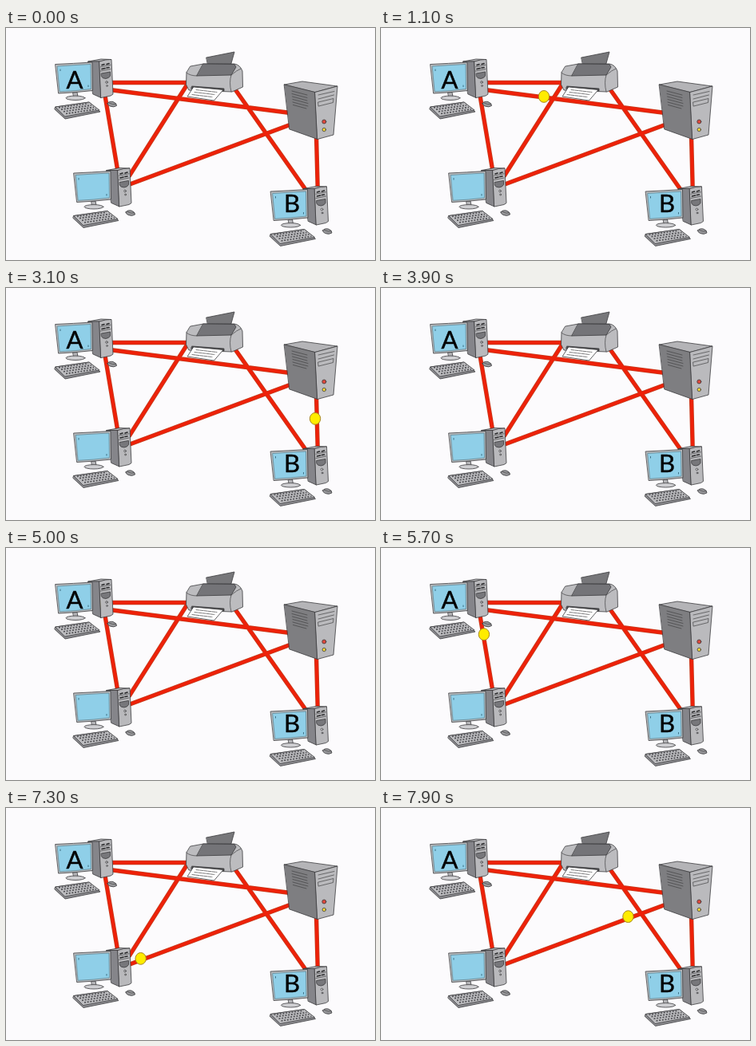
These frames come from a looping animation (462 px wide and 291 px high, 8000 ms). An HTML page:

```html
<!DOCTYPE html>
<html lang="en">
<head>
<meta charset="utf-8">
<title>Network routes</title>
<style>
  html, body { margin: 0; width: 100%; height: 100%; overflow: hidden; background: #fcfbfd; }
  svg { display: block; width: 462px; height: 291px; }
  .ink { stroke: #3c3c3e; stroke-width: .8; stroke-linejoin: round; stroke-linecap: round; }
  .thin { stroke: #424244; stroke-width: .7; fill: none; }
  .edge { stroke: #c43a1c; stroke-width: 5.4; fill: none; }
  .link { stroke: #ee2109; stroke-width: 3.8; fill: none; }
  text { font: 31px Lato, Carlito, sans-serif; text-anchor: middle; stroke: #000; stroke-width: .4; }
</style>
</head>
<body>
<svg viewBox="0 0 462 291">
  <defs>
    <path id="routes" d="M130 68.500H232M130 77.500L356 106.500M123.500 82L140 180M154 186L228 69M155 196L358 120.500M285.500 75L377.500 206M388.500 134L390.300 204"/>
    <g id="computer" class="ink">
      <!-- tower -->
      <path d="M103 42L119 39L132 39.500L117 42Z" fill="#b4b4b7"/>
      <path d="M103 42L117 42L119 87.500L109 83Z" fill="#85858a"/>
      <path d="M117 42Q125 39 132 39.500L134 83L131 85L119 87.500Z" fill="#b9b9bc"/>
      <path d="M120 46.500L123 45.500M126 45.500L129 44.500M120 51.500L124 50.500M126 50L129 49.500" stroke="#28282a" stroke-width="1.700"/>
      <path class="thin" d="M118.500 48.800L131 46.300M118.500 54L131 51.500"/>
      <path d="M119.500 57L130.500 55L130.500 60Q129 63 125 63.500Q121 63.500 119.500 61Z" fill="#77777b"/>
      <circle cx="126" cy="68" r="1.300" fill="#e6e6e8"/>
      <circle cx="126.500" cy="72.500" r=".9" fill="#e6e6e8"/>
      <!-- monitor -->
      <path d="M84 81L89 80.500L90 86L85 86.500Z" fill="#b5b5b8"/>
      <ellipse cx="87" cy="87.800" rx="12" ry="2.700" fill="#cfcfd2"/>
      <path d="M62 45.500Q84 44.500 108 43L108.500 78.500Q87 81 66 82Z" fill="#b9bcbf"/>
      <path d="M64.500 48Q85 46.500 106 45.500L106.500 76.500Q87 79 67.500 79.800Z" fill="#8fcfe8" stroke="#5f8796"/>
      <path d="M68 52v1.600M103 72v1.600" stroke="#28596b"/>
      <!-- keyboard -->
      <path d="M62 99L104 93L118 105L74 114L61 102Z" fill="#8d8d91"/>
      <path d="M62 99L104 93L117 103L74 111Z" fill="#bcbcbf"/>
      <path d="M66 99.800L103 94.700M69 102.200L107 97M72 104.800L110 99.400M75 107.500L113 101.800"
            fill="none" stroke="#4f4f53" stroke-width="1.700" stroke-dasharray="2 1.700" stroke-linecap="butt"/>
      <!-- mouse -->
      <path d="M127 94.500Q129 91.500 134 92.500Q139 94.500 138.500 97.500Q135 100 130 98Q127 96.500 127 94.500Z" fill="#99999c"/>
      <path class="thin" d="M129 94Q134 96.500 137.500 95.500"/>
    </g>
  </defs>

  <use href="#routes" class="edge"/>
  <use href="#routes" class="link"/>

  <ellipse id="packet" rx="6.700" ry="7.400" fill="#ffec00" stroke="#a8861c" stroke-width="1" visibility="hidden"/>

  <use href="#computer"/>
  <use href="#computer" x="23" y="136.500"/>
  <use href="#computer" x="269.500" y="159.500"/>
  <text x="86" y="75.500">A</text>
  <text x="358" y="230.500">B</text>

  <g class="ink">
    <!-- printer -->
    <path d="M251 37L286 30L281 48L253 47Z" fill="#77777a"/>
    <path d="M231 48L247 45L286 45Q293 46 296 54L296.500 74L283 80L229 78L225.500 71L226 56Z" fill="#bcbcbf"/>
    <path d="M247 45L286 45.500L288 49L282 59L239 60Z" fill="#747478"/>
    <path class="thin" d="M226 56Q230 60 239 60M282 59Q279 68 282 80M282 59Q289 53 294 51"/>
    <path d="M233 73L273 76L273 79L232 76Z" fill="#4a4a4c"/>
    <path d="M235 74L272 77.500L260.500 91L227.500 86Z" fill="#fff"/>
    <path class="thin" d="M238 77.500L264 80.500M236 80.500L261 83.500M233 83.500L258 86.500" stroke-dasharray="4 1"/>
    <!-- server -->
    <path d="M348.500 71L371 67L415 73L387 80.500Z" fill="#b4b4b7"/>
    <path d="M348.500 71L387 80.500L390 139.500L355 127Z" fill="#7e7e81"/>
    <path d="M387 80.500L415 73L410 134L390 139.500Z" fill="#bababd"/>
    <path class="thin" d="M358 79L377 84M358 82.500L377 87.500M358.500 86L377 91M359 89.500L378 94.500M359 93L378 98M359.500 96.500L376 101"/>
    <path class="thin" d="M391 84L411 79.500M391 89L410.500 84M391 93L410 88.500L409.500 93.500L391.500 98Z"/>
    <circle cx="398.300" cy="117.500" r="2.500" fill="#e0483c"/>
    <circle cx="398.300" cy="127.500" r="2.200" fill="#f2d637"/>
  </g>
</svg>
<script>
  const LOOP = 8000, STEP = 100;
  const packet = document.getElementById('packet');

  // Packets slip out from behind one device and vanish behind the next.
  const trips = [
    { start: 300, end: 2300, period: 2000, from: [110, 74], to: [382, 108.5] },
    { start: 2300, end: 3550, period: 2000, from: [386.3, 101], to: [388.5, 283] },
    { start: 5000, end: 6600, period: 2000, from: [122.5, 70], to: [146, 210] },
    { start: 7025, end: 8000, period: 1400, from: [147, 197], to: [382, 109] }
  ];
  const ease = p => (1 - Math.cos(Math.PI * p)) / 2;

  function draw(now) {
    const time = Math.floor((now % LOOP) / STEP) * STEP;
    const trip = trips.find(t => time >= t.start && time < t.end);
    packet.setAttribute('visibility', trip ? 'visible' : 'hidden');
    if (trip) {
      const k = ease((time - trip.start) / trip.period);
      const [x, y] = trip.from.map((a, i) => a + (trip.to[i] - a) * k);
      packet.setAttribute('transform', `translate(${x} ${y})`);
    }
    requestAnimationFrame(draw);
  }
  requestAnimationFrame(draw);
</script>
</body>
</html>
```
